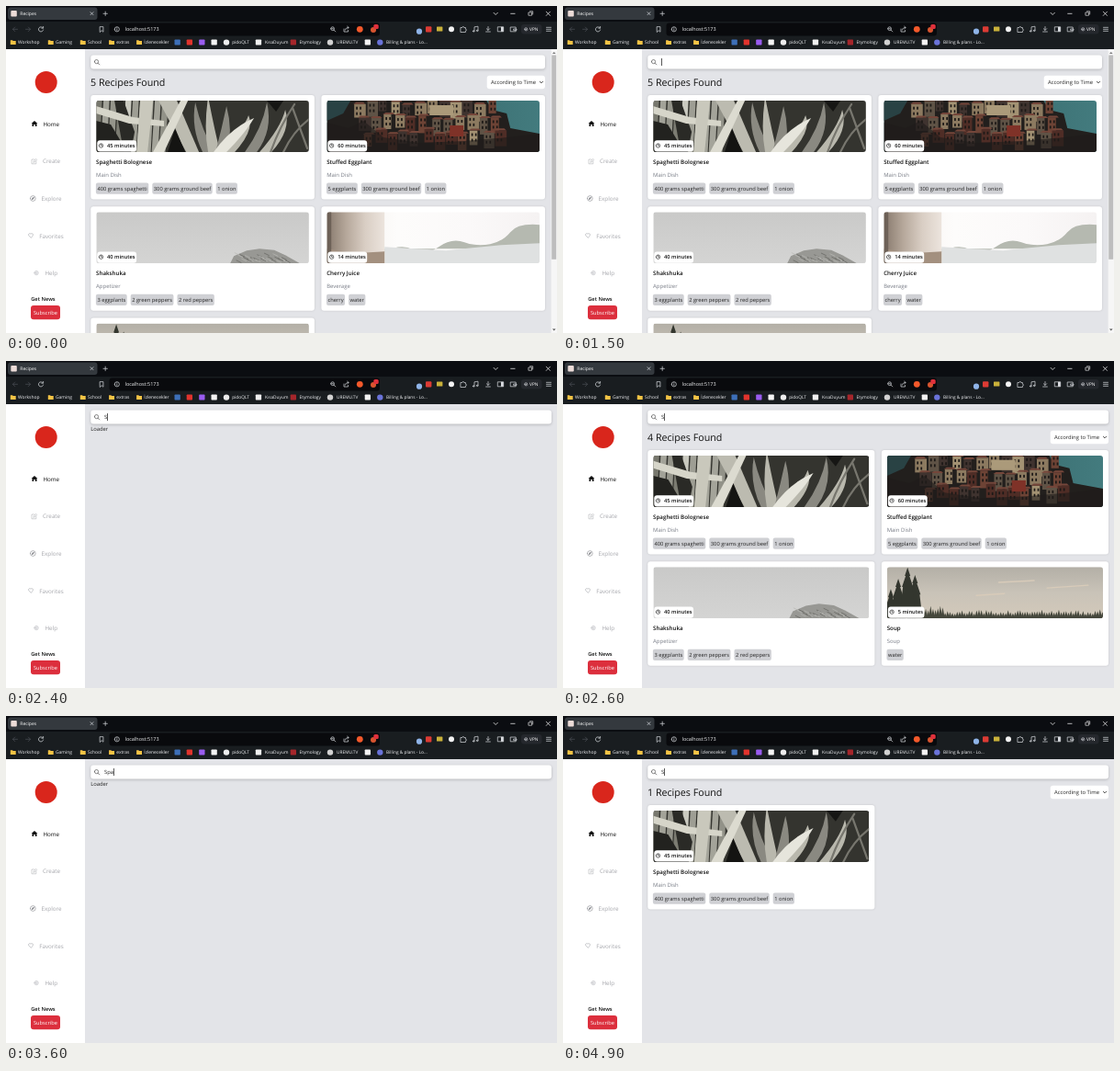
Write an HTML page that moves like this. It is 600 px wide and 356 px high and loops after 5000 ms.

```html
<!DOCTYPE html>
<html lang="en">
<head>
<meta charset="utf-8">
<title>Recipes</title>
<style>
html, body { margin: 0; width: 100%; height: 100%; overflow: hidden; background: #e3e4e8; }
svg { display: block; }
text { font-family: "Open Sans", "Noto Sans", sans-serif; text-rendering: geometricPrecision; white-space: pre; }
.b { font-weight: 600; }
.card { filter: drop-shadow(0 .5px .8px #0002); }
.field { filter: drop-shadow(0 1px 1.5px #0003); }
.line { fill: none; stroke-linecap: round; stroke-linejoin: round; }
</style>
</head>
<body>
<svg id="stage" width="600" height="356" viewBox="0 0 600 356"></svg>
<script>
const stage = document.getElementById('stage');
let nextId = 0;

function add(parent, tag, attrs = {}) {
  const el = document.createElementNS('http://www.w3.org/2000/svg', tag);
  for (const k in attrs) el.setAttribute(k, attrs[k]);
  return parent.appendChild(el);
}
const group = (p, attrs) => add(p, 'g', attrs);
const box = (p, x, y, width, height, fill, rx = 0, more = {}) =>
  add(p, 'rect', { x, y, width, height, fill, rx, ...more });
const dot = (p, cx, cy, r, fill) => add(p, 'circle', { cx, cy, r, fill });
const shape = (p, d, fill) => add(p, 'path', { d, fill });
const line = (p, d, stroke, w = .7) =>
  add(p, 'path', { d, stroke, 'stroke-width': w, class: 'line' });
const ring = (cx, cy, r) => `M${cx - r} ${cy}a${r} ${r} 0 1 0 ${2 * r} 0a${r} ${r} 0 1 0 ${-2 * r} 0`;
function label(p, str, x, y, size, fill, bold) {
  const el = add(p, 'text', { x, y, 'font-size': size, fill, class: bold ? 'b' : '' });
  el.textContent = str;
  return el;
}
function random(seed) {
  return () => (seed = (seed * 16807) % 2147483647) / 2147483647;
}
function gradient(p, stops, vertical) {
  const id = 'g' + nextId++;
  const g = add(p, 'linearGradient', { id, x2: vertical ? 0 : 1, y2: vertical ? 1 : 0 });
  stops.forEach((c, i) => add(g, 'stop', { offset: i / (stops.length - 1), 'stop-color': c }));
  return `url(#${id})`;
}

// ---------- browser window ----------
function drawBrowser() {
  const g = group(stage), ink = '#d9dbe0', dim = '#4c5056';
  box(g, 0, 0, 600, 47, '#191d20');
  box(g, 0, 0, 600, 17, '#0b0d11');
  box(g, 2, 1.5, 97.5, 13.5, '#34393e', 3);
  box(g, 5.3, 5, 6.5, 6.5, '#ecdcd8', 1);
  label(g, 'Recipes', 15.3, 10.2, 5, '#fff');
  line(g, 'M92 6.7l3 3m0-3l-3 3M106 8.3h4.4m-2.2-2.2v4.4', ink);
  line(g, 'M531 7.3l2.2 2.2 2.2-2.2M549.7 8.3h4.4M588.3 6.2l4.2 4.2m0-4.2l-4.2 4.2', '#fff');
  line(g, 'M569.3 7h3.2v3.2h-3.2zM570.5 5.8h3.2v3.2', '#fff', .6);

  line(g, 'M12.5 25.3h-5m2.2-2.3l-2.3 2.3 2.3 2.3M21.5 25.3h5m-2.2-2.3l2.3 2.3-2.3 2.3', dim);
  line(g, 'M40 23.6a2.6 2.6 0 1 0 .6 2.4M40.6 22.4v1.8h-1.8', ink);
  line(g, 'M102.5 22.6h3.4v5.6l-1.7-1.5-1.7 1.5z', ink);
  box(g, 112.5, 18.5, 294.5, 14, '#090a0d', 3);
  line(g, ring(120.8, 25.3, 2.6) + 'M120.8 25v1.5M120.8 23.8v.1', ink);
  label(g, 'localhost:5173', 129.5, 27.2, 5.5, '#f2f3f5');
  line(g, ring(355.6, 24.7, 1.9) + 'M357 26.1l1.8 1.8M354.8 24.7h1.6', ink);
  line(g, 'M368 25v3h4.5v-1.5M369.5 26c.3-2 1.5-2.5 3.5-2.5m-1.3-1.3l1.5 1.3-1.5 1.3', ink);
  dot(g, 385.3, 25.3, 3.4, '#f4592b');
  dot(g, 400, 26, 3, '#d8542f');
  box(g, 400.3, 20, 5.4, 5, '#e0313c', 1.6);

  dot(g, 450, 27.7, 3.1, '#8fb4e8');
  box(g, 457, 22.3, 6.4, 6.2, '#dc3b34', 1);
  box(g, 469, 22.6, 6.4, 5, '#c9b13a', .5);
  dot(g, 485, 25.3, 3, '#f4f4f4');
  line(g, 'M495.3 23.5h1.5a1 1 0 0 1 2 0h1.6v1.6a1 1 0 0 1 0 2v1.4h-5.1z', ink);
  line(g, 'M510 27.4v-4.6l4-.6v4.6' + ring(509.2, 27.4, .8) + ring(513.2, 26.8, .8), ink);
  line(g, 'M525 22.5v3.8m-1.7-1.6l1.7 1.7 1.7-1.7M522.6 28h4.8', ink);
  line(g, 'M535.7 22.8h6v5h-6z', ink);
  box(g, 539, 22.8, 2.7, 5, ink);
  line(g, 'M549.6 23h5.6v4.8h-5.6zM553 25h3v1.4h-3z', ink);
  box(g, 561, 20, 22.5, 10.6, '#25282d', 3);
  line(g, ring(566.2, 25.3, 1.6) + ring(566.2, 25.3, .4), ink, .6);
  label(g, 'VPN', 570, 27, 4.9, '#fff');
  line(g, 'M588.5 23.3h5M588.5 25.3h5M588.5 27.3h5', ink);

  const names = [['Workshop', 13], ['Gaming', 54], ['School', 89], ['extras', 120.3], ['İzlenecekler', 150.3]];
  for (const [s, x] of names) {
    shape(g, `M${x - 8.2} 37.2h2.2l.8.9h2.9v4h-5.9z`, '#f5c445');
    label(g, s, x, 41.4, 4.95, '#f2f3f5');
  }
  const marks = [[183.5, '#3d6fb8'], [196.7, '#e1332d'], [210.2, '#9a5cf0'], [223.5, '#f4f4f4'],
    [271.8, '#f1f1f1'], [309.7, '#a5262b'], [390.7, '#f4f4f4']];
  for (const [x, c] of marks) box(g, x, 36.5, 6.3, 6, c, .8);
  for (const [x, c] of [[240, '#ededed'], [353, '#d2d2d2'], [407.3, '#6a73d9']]) dot(g, x, 39.6, 3.2, c);
  const sites = [['pidoQLT', 246.2], ['KısaDuyum', 282], ['Etymology', 319.6],
    ['UREMU.TV', 360], ['Billing & plans - Lo...', 414]];
  for (const [s, x] of sites) label(g, s, x, 41.4, 4.8, '#f2f3f5');
}

// ---------- left menu ----------
function drawMenu() {
  const g = group(stage), grey = '#a5a6ab';
  box(g, 0, 47, 86, 309, '#fff');
  dot(g, 43.7, 83, 12, '#d9261c');
  shape(g, 'M31 125l3.3 3h-.8v3.1h-1.7v-2h-1.6v2h-1.7v-3.1h-.8z', '#111');
  line(g, 'M31 167h-3v4.8h4.8v-3M30 170l.3-1.2 2.4-2.4.9.9-2.4 2.4z', grey, .5);
  line(g, ring(29.3, 209.5, 2.9), '#85868b', .6);
  shape(g, 'M31 207.8l-1 2.4-2.4 1 1-2.4z', '#85868b');
  line(g, 'M27 252.2l-2.3-2.4a1.3 1.3 0 0 1 2.3-1.5a1.3 1.3 0 0 1 2.3 1.5z', grey, .6);
  line(g, ring(33, 290.6, 2.2) + ring(33, 290.6, .9), '#b4b5ba', .6);
  const items = [['Home', 40.4, 130.7], ['Create', 40, 171.4], ['Explore', 38.6, 212],
    ['Favorites', 36.2, 252.7], ['Help', 42.5, 293.4]];
  items.forEach(([s, x, y], i) => label(g, s, x, y, 6.25, i ? grey : '#111'));
  label(g, 'Get News', 27.2, 321.2, 5.75, '#111', true);
  box(g, 27, 326.1, 32, 15.2, '#dc2f3d', 3);
  label(g, 'Subscribe', 30, 336.2, 5.7, '#fff');
}

// ---------- photos, each 232 x 56 ----------
const photos = {
  agave(g) {
    box(g, 0, 0, 232, 56, '#34342f');
    const rnd = random(11);
    for (let x = 0; x < 78; x += 8) {
      const v = 120 + rnd() * 95 | 0;
      shape(g, `M${x} 0h6.5l-3 56h-7z`, `rgb(${v},${v},${v - 10})`);
    }
    shape(g, 'M0 22L16 26 34 56H0z', '#22221f');
    shape(g, 'M20 0H30L42 34 38 56H30z', '#2a2a26');
    shape(g, 'M0 6L40 18 74 22V28L36 25 0 14z', '#d6d5c9');
    shape(g, 'M48 0H62L56 56H44z', '#c9c8bc');
    shape(g, 'M68 0L88 0 112 56H98z', '#bcbbb0');
    shape(g, 'M92 0H100L74 56H62z', '#dcdbd0');
    shape(g, 'M78 56L86 30 97 56z', '#141412');
    const leaves = [[108, 2, 122], [122, -4, 128], [142, 6, 136], [166, 16, 144], [186, 2, 168], [206, 10, 184]];
    leaves.forEach(([x, y, root], i) =>
      shape(g, `M${root - 6} 56Q${x - 5} 30 ${x} ${y}Q${x + 7} 32 ${root + 7} 56z`, i % 2 ? '#b9b8ad' : '#8a8981'));
    shape(g, 'M128 56Q146 30 172 19Q162 36 142 56z', '#e6e5dc');
    line(g, 'M190 56Q200 28 216 4M204 56Q214 34 232 20M214 8L230 52', '#77766e', 2.2);
    shape(g, 'M186 0H204L196 12z', '#161614');
  },
  town(g) {
    box(g, 0, 0, 232, 56, gradient(g, ['#2f5c5f', '#437b7e'], false));
    shape(g, 'M0 0H174L180 10 196 14 200 30 232 36V56H0z', '#221f1d');
    shape(g, 'M0 0H26L18 14 0 22z', '#294244');
    const rnd = random(29);
    const tints = ['#5f5346', '#4f2d26', '#8c7a60', '#3f332f', '#6d4335', '#a39273'];
    for (let row = 0; row < 3; row++) {
      for (let i = 0; i < 12; i++) {
        const x = 30 + i * 13 + row * 4 + rnd() * 4, y = row * 16 - 2 + rnd() * 7;
        box(g, x, y, 8 + rnd() * 5, 13 + rnd() * 6, tints[rnd() * 6 | 0]);
        shape(g, `M${x - 1} ${y}l3-2h8l2 2z`, '#74463a');
        for (let k = 0; k < 4; k++) box(g, x + 2 + k % 2 * 4, y + 3 + (k >> 1) * 6, 1.7, 3, '#1d1917');
      }
    }
    shape(g, 'M0 24L24 30 40 22 62 40 100 46 150 44 196 40 232 36V56H0z', '#1f1c1a99');
    box(g, 112, 5, 26, 11, '#ab9a7a');
    box(g, 134, 27, 15, 12, '#7f3228');
  },
  rock(g) {
    box(g, 0, 0, 232, 56, gradient(g, ['#c9c9c8', '#cfcfce', '#d4d4d3'], true));
    shape(g, 'M146 56L150 48 164 42 178 40 194 41.5 206 47 222 56z', '#989894');
    const rnd = random(7);
    for (let i = 0; i < 30; i++) {
      const x = 151 + i * 1.9, y = 44.5 + rnd() * 9;
      line(g, `M${x} ${y}l5 2.4`, i % 2 ? '#62625e' : '#b9b9b5', .7);
    }
  },
  haze(g) {
    box(g, 0, 0, 232, 56, gradient(g, ['#f3eeea', '#fdfcfb', '#fbf9f9', '#f5f2f2'], false));
    shape(g, 'M63 44Q80 34 94 41T122 38T150 33T178 35T200 22T232 14V40H63z', '#b5b9b0');
    shape(g, 'M63 38L130 42 190 36 232 34V56H63z', '#dfe1e1');
    box(g, 0, 0, 63, 56, gradient(g, ['#86786c', '#b5a79a', '#d9cec4', '#ece4dd'], false));
    shape(g, 'M0 40L30 45 63 43V56H0z', '#a3907f');
    box(g, 0, 0, 5, 56, '#6d6157');
  },
  pines(g) {
    box(g, 0, 0, 232, 56, gradient(g, ['#b3afa6', '#c9c3b8', '#d3c9ba'], true));
    line(g, 'M120 17l38-2M172 23l44-3M96 31l30-2', '#d8cbb9', 1.4);
    const rnd = random(5);
    for (let x = 0; x < 234; x += 2.6) {
      const h = 5 + rnd() * 5 + (x < 60 ? 4 : 0);
      shape(g, `M${x} ${56 - h}l2.4 ${h}h-4.8z`, '#45473c');
    }
    for (const [x, y] of [[4, 24], [12, 13], [30, 9], [22, 1]])
      shape(g, `M${x} ${y}l3 9-1 0 4 12-1 0 4 34h-18l4-34-1 0 4-12-1 0z`, '#33362e');
  }
};

// ---------- recipes ----------
const recipes = [
  ['Spaghetti Bolognese', 'Main Dish', 45, 'agave', ['400 grams spaghetti', '300 grams ground beef', '1 onion']],
  ['Stuffed Eggplant', 'Main Dish', 60, 'town', ['5 eggplants', '300 grams ground beef', '1 onion']],
  ['Shakshuka', 'Appetizer', 40, 'rock', ['3 eggplants', '2 green peppers', '2 red peppers']],
  ['Cherry Juice', 'Beverage', 14, 'haze', ['cherry', 'water']],
  ['Soup', 'Soup', 5, 'pines', ['water']]
];

function drawCard(p, [title, kind, minutes, photo, parts], x, y, w) {
  const g = group(p, { transform: `translate(${x} ${y})` });
  box(g, 0, 0, w, 113.5, '#fff', 3, { class: 'card' });
  const id = 'c' + nextId++, pw = w - 12;
  box(add(g, 'clipPath', { id }), 6, 6, pw, 56, '#000', 3);
  const frame = group(g, { 'clip-path': `url(#${id})` });
  photos[photo](add(frame, 'svg', { x: 6, y: 6, width: pw, height: 56,
    viewBox: '0 0 232 56', preserveAspectRatio: 'xMidYMid slice' }));

  const badge = box(g, 7, 49.2, 10, 12.3, '#fff', 3);
  line(g, ring(11.2, 55, 2.2) + 'M11.2 53.7v1.4h1', '#111', .6);
  const time = label(g, minutes + ' minutes', 17.8, 57.1, 5.7, '#111', true);
  badge.setAttribute('width', time.getComputedTextLength() + 12.3);

  label(g, title, 5.8, 74.8, 6.2, '#111', true);
  label(g, kind, 5.8, 88.7, 5.95, '#777b85');
  let left = 5.6;
  for (const part of parts) {
    const tag = box(g, left, 95.5, 10, 12.2, '#cfd0d4', 2);
    const tw = label(g, part, left + 1.5, 103.5, 5.75, '#222').getComputedTextLength() + 3;
    tag.setAttribute('width', tw);
    left += tw + 4;
  }
}

function drawResults(picks, right) {
  const g = group(stage), w = (right - 92.3 - 7.5) / 2;
  label(g, picks.length + ' Recipes Found', 92, 87.4, 10.7, '#111');
  box(g, right - 63.3, 75.8, 63.3, 14.4, '#fff', 3);
  label(g, 'According to Time', right - 59, 85.2, 5.85, '#222');
  line(g, `M${right - 5.6} 82.2l1.6 1.6 1.6-1.6`, '#111', .8);
  picks.forEach((n, i) =>
    drawCard(g, recipes[n], 92.3 + i % 2 * (w + 7.5), 97 + (i >> 1) * 121.2, w));
  return g;
}

function drawScrollbar() {
  const g = group(stage);
  box(g, 593.6, 47, 6.4, 309, '#f6f6f6');
  box(g, 594.2, 53.5, 5, 222.3, '#bdbdbd');
  shape(g, 'M595 52l1.8-2 1.8 2z', '#777');
  shape(g, 'M595 351.4l1.8 2 1.8-2z', '#555');
  return g;
}

box(stage, 0, 0, 600, 356, '#e3e4e8');
const views = {
  all: drawResults([0, 1, 2, 3, 4], 587),
  some: drawResults([0, 1, 2, 4], 594),
  one: drawResults([0], 594),
  load: label(stage, 'Loader', 92.2, 75.6, 5.85, '#222')
};
const scrollbar = drawScrollbar();
const field = box(stage, 92.3, 53.6, 494.7, 15, '#fff', 3, { class: 'field' });
line(stage, ring(98.5, 60.6, 2.1) + 'M100.1 62.2l1.7 1.7', '#555');
const query = label(stage, '', 107, 63.2, 5.8, '#222');
const caret = box(stage, 107, 57, .7, 8, '#111');
drawMenu();
drawBrowser();

// ---------- timeline: start, view, typed text ----------
const LOOP = 5000, FOCUS = 1500;
const steps = [
  [0, 'all', ''], [2100, 'all', 'S'], [2300, 'load', 'S'], [2600, 'some', 'S'],
  [3200, 'some', 'Sp'], [3600, 'load', 'Spa'], [3900, 'one', 'Spa'],
  [4600, 'one', 'Sp'], [4800, 'one', 'S']
];
const show = (el, on) => { el.style.display = on ? '' : 'none'; };

function render(t) {
  const [, view, typed] = steps.filter(s => s[0] <= t).pop();
  for (const k in views) show(views[k], k === view);
  show(scrollbar, view === 'all');
  field.setAttribute('width', view === 'all' ? 494.7 : 501.7);
  if (query.textContent !== typed) query.textContent = typed;
  show(caret, t >= FOCUS);
  caret.setAttribute('x', 107 + (typed ? query.getComputedTextLength() : 0));
}

const start = performance.now();
function tick() {
  render((performance.now() - start) % LOOP);
  requestAnimationFrame(tick);
}
tick();
</script>
</body>
</html>
```
